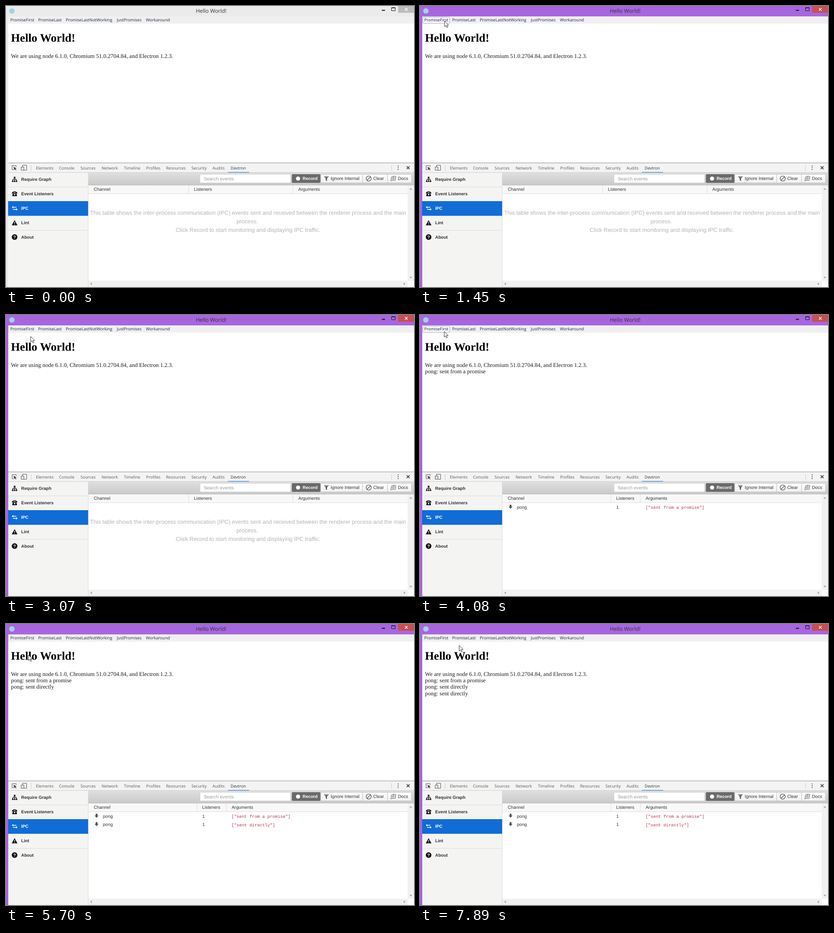
Animation of 901 by 622 pixels, one loop 8000 ms. Source, as an HTML page:

```html
<!DOCTYPE html>
<html lang="en">
<head>
<meta charset="utf-8">
<title>Hello World!</title>
<style>
html, body { margin: 0; width: 100%; height: 100%; overflow: hidden; background: #fff; }
svg { display: block; width: 901px; height: 622px; }
text { text-rendering: geometricPrecision; white-space: pre; }

.ui { font: 9.1px "Open Sans", "Noto Sans", sans-serif; fill: #1c2a40; }
.tabs { fill: #5a5a5a; }
.title { font-size: 11.85px; fill: #333; text-anchor: middle; }
.page { font: 12.77px "Liberation Serif", serif; fill: #1c1c1c; }
.page .h1 { font-size: 25.5px; font-weight: bold; fill: #000; }
.sans { font: 9.85px "Liberation Sans", sans-serif; fill: #333; }
.bold { font: bold 9.65px "Liberation Sans", sans-serif; fill: #333; }
.search { font-size: 10.35px; fill: #999; }
.empty { font-size: 12.5px; fill: #b4b4b4; text-anchor: middle; }
.code { font: 9.45px "Liberation Mono", monospace; fill: #c0304e; }
.white { fill: #fff; }
.line { fill: none; stroke: #555; }

/* Timed layers: hidden until their keyframes reveal them */
.layer { opacity: 0; animation: 8s step-end infinite; }
.active { animation-name: active; }
.hover1 { animation-name: hover1; }
.open1 { animation-name: open1; }
.pick1 { animation-name: pick1; }
.pick2 { animation-name: pick2; }
.hover2 { animation-name: hover2; }
.open2 { animation-name: open2; }
.pick3 { animation-name: pick3; }
.pong1 { animation-name: pong1; }
.pong2 { animation-name: pong2; }
.pong3 { animation-name: pong3; }
@keyframes active { 17.25% { opacity: 1 } }
@keyframes hover1 { 15.25%, 51% { opacity: 1 } 19%, 52.875% { opacity: 0 } }
@keyframes open1 { 19%, 52.875% { opacity: 1 } 29.625%, 70.375% { opacity: 0 } }
@keyframes pick1 { 23.875%, 57.125% { opacity: 1 } 29.625%, 59.75% { opacity: 0 } }
@keyframes pick2 { 59.75% { opacity: 1 } 70.375% { opacity: 0 } }
@keyframes hover2 { 80.125% { opacity: 1 } 83% { opacity: 0 } }
@keyframes open2 { 83% { opacity: 1 } 98.625% { opacity: 0 } }
@keyframes pick3 { 89.875% { opacity: 1 } 98.625% { opacity: 0 } }
@keyframes pong1 { 40.375% { opacity: 1 } }
@keyframes pong2 { 71.25% { opacity: 1 } }
@keyframes pong3 { 98.625% { opacity: 1 } }

.cursor { animation: cursor 8s step-end infinite; }
@keyframes cursor {
  0% { transform: translate(-30px, 0) }
  3.625% { transform: translate(645px, 493px); animation-timing-function: steps(3) }
  6.5% { transform: translate(470px, 345px); animation-timing-function: steps(4) }
  10.375% { transform: translate(140px, 120px); animation-timing-function: steps(3) }
  13.25% { transform: translate(58px, 44px); animation-timing-function: steps(3) }
  16.25% { transform: translate(54px, 33px) }
  21.875% { transform: translate(54px, 33px); animation-timing-function: steps(3) }
  24.875% { transform: translate(54px, 46px) }
  38.375% { transform: translate(54px, 47px); animation-timing-function: steps(4) }
  42.375% { transform: translate(58px, 99px) }
  43.125% { transform: translate(58px, 99px); animation-timing-function: steps(8) }
  51% { transform: translate(53px, 36px) }
  56.25% { transform: translate(53px, 36px); animation-timing-function: steps(5) }
  60.625% { transform: translate(49px, 68px) }
  75.125% { transform: translate(49px, 68px); animation-timing-function: steps(5) }
  80.125% { transform: translate(78px, 35px) }
  88.875% { transform: translate(78px, 35px); animation-timing-function: steps(2) }
  90.75%, 100% { transform: translate(86px, 47px) }
}
</style>
</head>
<body>
<svg viewBox="0 0 901 622" xmlns="http://www.w3.org/2000/svg">
  <defs>
    <linearGradient id="bar" x2="0" y2="1"><stop stop-color="#dfdfdf"/><stop offset="1" stop-color="#c9c9c9"/></linearGradient>
    <linearGradient id="btn" x2="0" y2="1"><stop stop-color="#fdfdfd"/><stop offset="1" stop-color="#f1f1f1"/></linearGradient>
    <g id="hover"><rect x=".5" y="24.5" width="59" height="14" rx="2" fill="#f6f6f9" stroke="#a9adb8"/></g>
    <g id="open"><rect x=".5" y="24.5" width="59" height="14" rx="1.5" fill="#c9c9cf" stroke="#94949c"/></g>
    <g id="menu">
      <path d="M3 41H99V84H3Z" fill="#000" opacity=".16"/>
      <path d="M2 40H98V82H2Z" fill="#000" opacity=".35"/>
      <rect x=".5" y="38.5" width="95" height="42" fill="#fff" stroke="#a5a5a5"/>
    </g>
    <rect id="pick" x="0" width="96" height="19.5" fill="#3f81ee"/>
    <path id="down" d="M-2 -4.5H2V-.5H4.2L0 4.5L-4.2 -.5H-2Z" fill="#555"/>
    <path id="arrow" d="M0 -2L3 1.6H-3Z" fill="#a0a0a0"/>
  </defs>

  <!-- Window frame -->
  <rect width="901" height="622" fill="#ebebeb"/>
  <rect x="866" width="35" height="15" fill="#bcbcbc"/>
  <g class="layer active">
    <path d="M0 0H901V23H5V622H0Z" fill="#a865e0"/>
    <rect x="866" width="35" height="15" fill="#c75050"/>
  </g>
  <circle cx="13" cy="11" r="6" fill="#9fd3e6"/>
  <text class="ui title" x="453" y="15">Hello World!</text>
  <path d="M830 9.5H837" stroke="#111" stroke-width="2"/>
  <path d="M851.5 3.5H859.5V10.5H851.5ZM851 4.2H860" fill="none" stroke="#111"/>
  <path d="M881 4.5L887 10.5M887 4.5L881 10.5" stroke="#fff" stroke-width="1.4"/>

  <!-- Page -->
  <rect x="5" y="23" width="896" height="16" fill="#f0f0f0"/>
  <rect x="5" y="39" width="896" height="308" fill="#fff"/>
  <g class="page">
    <text class="h1" x="11" y="79">Hello World!</text>
    <text x="11" y="114.6">We are using node 6.1.0, Chromium 51.0.2704.84, and Electron 1.2.3.</text>
    <text class="layer pong1" x="11" y="129">pong: sent from a promise</text>
    <text class="layer pong2" x="11" y="143.4">pong: sent directly</text>
    <text class="layer pong3" x="11" y="157.8">pong: sent directly</text>
  </g>

  <!-- Menu bar -->
  <use href="#hover" x="6" class="layer hover1"/>
  <use href="#open" x="6" class="layer open1"/>
  <use href="#hover" x="67" class="layer hover2"/>
  <use href="#open" x="67" class="layer open2"/>
  <g class="ui">
    <text x="9.5" y="34.3">PromiseFirst</text>
    <text x="71" y="34.3">PromiseLast</text>
    <text x="132" y="34.3">PromiseLastNotWorking</text>
    <text x="244.7" y="34.3">JustPromises</text>
    <text x="309" y="34.3">Workaround</text>
  </g>
  <g class="ui layer open1">
    <use href="#menu" x="5"/>
    <text x="25.3" y="53.4">Ping Promise</text>
    <text x="25.3" y="72.8">Ping Direct</text>
  </g>
  <g class="ui layer pick1">
    <use href="#pick" x="5" y="40"/>
    <text class="white" x="25.3" y="53.4">Ping Promise</text>
  </g>
  <g class="ui layer pick2">
    <use href="#pick" x="5" y="59.5"/>
    <text class="white" x="25.3" y="72.8">Ping Direct</text>
  </g>
  <g class="ui layer open2">
    <use href="#menu" x="67"/>
    <text x="87" y="53.4">Ping Direct</text>
    <text x="87" y="72.8">Ping Promise</text>
  </g>
  <g class="ui layer pick3">
    <use href="#pick" x="67" y="40"/>
    <text class="white" x="87" y="53.4">Ping Direct</text>
  </g>

  <!-- Developer tools tabs -->
  <rect x="5" y="347" width="896" height="22" fill="#f3f3f3"/>
  <path d="M5 347.3H901" stroke="#a0a0a0" stroke-width="1.3"/>
  <path d="M5 368.6H901" stroke="#ccc"/>
  <rect x="490" y="367.5" width="47" height="1.6" fill="#4a90e2"/>
  <path class="line" d="M17 362.5H13.5V353.5H22.5V356"/>
  <path d="M16.5 356L23.5 359.3L20.8 360.2L23 363L21.8 364L19.6 361.2L18.2 363.4Z" fill="#444"/>
  <path class="line" d="M36.5 356V352.5H45.5V363.5H40M33.5 356.5H39.5V363.5H33.5Z"/>
  <path d="M55.5 352V365M851.5 352V365" stroke="#ccc"/>
  <g class="ui tabs">
    <text x="66" y="361.7">Elements</text>
    <text x="117" y="361.7">Console</text>
    <text x="164.5" y="361.7">Sources</text>
    <text x="211" y="361.7">Network</text>
    <text x="260.5" y="361.7">Timeline</text>
    <text x="309.5" y="361.7">Profiles</text>
    <text x="353.5" y="361.7">Resources</text>
    <text x="409.5" y="361.7">Security</text>
    <text x="456" y="361.7">Audits</text>
    <text x="496" y="361.7" fill="#333">Devtron</text>
  </g>
  <path d="M866 354V354.01M866 358V358.01M866 362V362.01" stroke="#444" stroke-width="2.2" stroke-linecap="round"/>
  <path d="M884.8 354.8L891.2 361.2M891.2 354.8L884.8 361.2" stroke="#444" stroke-width="1.8"/>

  <!-- Sidebar -->
  <rect x="5" y="369" width="176" height="253" fill="#f4f4f3"/>
  <path d="M5 400.5H181M5 496.5H181M181.5 369V622" stroke="#dcdcdc"/>
  <rect x="4.6" y="432" width="176.8" height="32.4" fill="#116cd6"/>
  <g class="bold">
    <text x="33.5" y="387.4">Require Graph</text>
    <text x="33.5" y="419.4">Event Listeners</text>
    <text x="33.5" y="451.4" class="white">IPC</text>
    <text x="33.5" y="483.4">Lint</text>
    <text x="33.5" y="515.4">About</text>
  </g>
  <path d="M19 379V388M15 388V385Q15 383 19 383Q23 383 23 385V388" fill="none" stroke="#111" stroke-width="1.3"/>
  <path d="M17.2 378H20.8V381H17.2ZM13.2 386.5H16.4V389.5H13.2ZM17.4 386.5H20.6V389.5H17.4ZM21.6 386.5H24.8V389.5H21.6Z" fill="#111"/>
  <path d="M13 415Q13 410.5 19 410.5Q25 410.5 25 415H21.5V413Q19 412.4 16.5 413V415ZM16.6 414.3H21.4L24 417.5V421H14V417.5Z" fill="#111"/>
  <circle cx="19" cy="417.4" r="1.6" fill="#f4f4f3"/>
  <path d="M13 445.5L16 442.7V444.7H23V446.3H16V448.3ZM25.5 450.3L22.5 447.5V449.5H15.5V451.1H22.5V453.1Z" fill="#fff"/>
  <path d="M19 474L25.3 485.5H12.7Z" fill="#111"/>
  <path d="M19 478V481.8M19 483V484.2" stroke="#f4f4f3" stroke-width="1.4"/>
  <circle cx="19" cy="511.5" r="6.2" fill="#111"/>
  <text class="bold white" x="16.1" y="515">?</text>

  <!-- Toolbar -->
  <rect x="182" y="369" width="719" height="28" fill="url(#bar)"/>
  <path d="M182 396.5H901" stroke="#bdbdbd"/>
  <rect x="428.5" y="372.5" width="200" height="19" rx="2" fill="#fff" stroke="#d2d2d2"/>
  <rect x="695" y="372.5" width="200.5" height="19" rx="2" fill="url(#btn)" stroke="#c2c0c2"/>
  <path d="M787.5 373V391M842.5 373V391" stroke="#c2c0c2"/>
  <rect x="631.3" y="372.3" width="63" height="19.2" rx="2" fill="#6b6a6b"/>
  <circle cx="645" cy="382" r="4.6" fill="#fff"/>
  <path d="M702 377H713L708.8 382V387.5L706.2 386V382Z" fill="#555"/>
  <path d="M703.5 378.4H711.5" stroke="#f6f6f6" stroke-width=".8"/>
  <g class="line" stroke-width="1.3">
    <circle cx="801" cy="382" r="5.6"/>
    <path d="M797 386L805 378"/>
    <path d="M851.5 378.3L856 376.8L861 377.3L859.5 386L854.5 385.7L849.8 387.2ZM856 376.8L854.5 385.7M852.3 380.6L854.2 380M851.9 383L853.8 382.4M857 379.7L859.2 379.9M856.6 382.2L858.8 382.4" stroke-width=".9"/>
  </g>
  <g class="sans">
    <text class="search" x="436.7" y="385.8">Search events</text>
    <text class="bold white" x="655" y="385.3">Record</text>
    <text x="717" y="385.3">Ignore Internal</text>
    <text x="811" y="385.3">Clear</text>
    <text x="865.5" y="385.3">Docs</text>
  </g>

  <!-- Event table -->
  <rect x="182" y="397" width="705" height="211" fill="#fff"/>
  <rect x="182" y="397" width="705" height="18.5" fill="#f8f8f8"/>
  <path d="M182 415.5H887M403.5 397V415M633.5 397V415" stroke="#dedede"/>
  <g class="sans">
    <text x="415" y="409.3">Listeners</text>
    <text x="645.5" y="409.3">Arguments</text>
    <g class="empty">
      <text x="534.5" y="461.7">This table shows the inter-process communication (IPC) events sent and received between the renderer process and the main</text>
      <text x="532.5" y="481">process.</text>
      <text x="534.5" y="500.2">Click Record to start monitoring and displaying IPC traffic.</text>
    </g>
  </g>
  <g class="sans layer pong1">
    <rect x="182" y="416" width="705" height="192" fill="#fff"/>
    <rect x="402" y="397" width="485" height="18" fill="#f8f8f8"/>
    <path d="M421.5 397V415M486.5 397V415" stroke="#dedede"/>
    <text x="433.3" y="409.3">Listeners</text>
    <text x="498.3" y="409.3">Arguments</text>
    <use href="#down" x="200" y="424.5"/>
    <text x="214" y="428.5">pong</text>
    <text x="433.5" y="428.5">1</text>
    <text class="code" x="498" y="429.3">["sent from a promise"]</text>
  </g>
  <g class="sans layer pong2">
    <use href="#down" x="200" y="443"/>
    <text x="214" y="447">pong</text>
    <text x="433.5" y="447">1</text>
    <text class="code" x="498" y="447.8">["sent directly"]</text>
  </g>
  <text class="sans" x="193.7" y="409.3">Channel</text>

  <!-- Scrollbars -->
  <path d="M887 397H901V608H887ZM182 608H887V622H182Z" fill="#f1f1f1"/>
  <rect x="887" y="608" width="14" height="14" fill="#fcfcfc"/>
  <use href="#arrow" transform="translate(894 405)"/>
  <use href="#arrow" transform="translate(894 601) rotate(180)"/>
  <use href="#arrow" transform="translate(188 615) rotate(-90)"/>
  <use href="#arrow" transform="translate(880 615) rotate(90)"/>

  <path class="cursor" d="M.5 .5V12.8L3.3 10.2L5.3 14.8L7.4 13.9L5.4 9.4H9.2Z" fill="#fff" stroke="#222" stroke-width=".9"/>
</svg>
</body>
</html>
```
